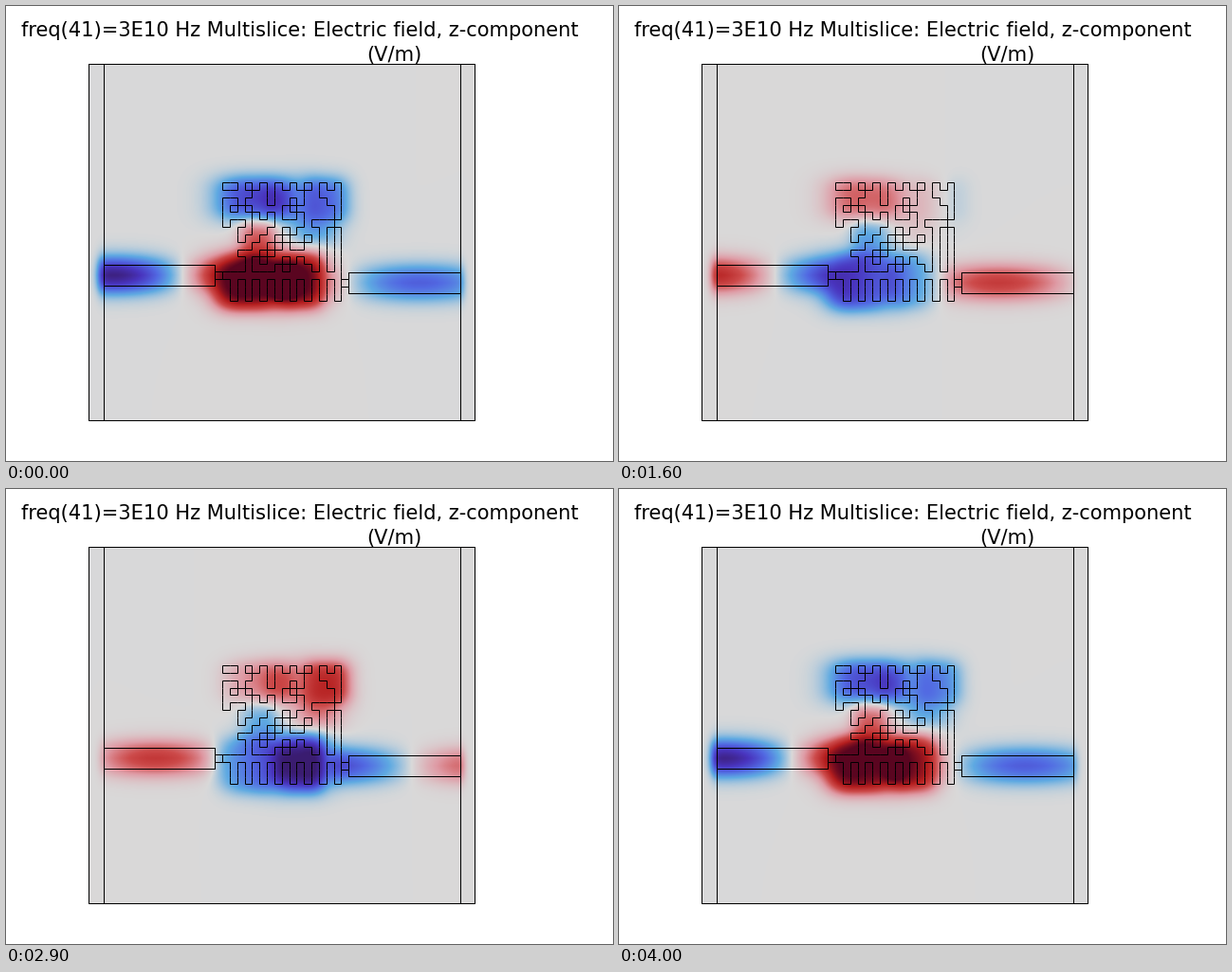
A matplotlib script for the animation above (4.1 s loop, 640x480 px).

```python
import numpy as np
import matplotlib.pyplot as plt
from matplotlib.animation import FuncAnimation
from matplotlib.collections import LineCollection
from matplotlib.colors import LinearSegmentedColormap

W, H, DPI = 640, 480, 100
FRAMES, STEP_MS = 41, 100
SPAN, GRID = 48, 16               # cells across the board and across the patch
CELL = 376 / SPAN
ORIGIN = np.array([102.7, 60.8])  # board corner in pixels
LEFT, RIGHT, TOP, BOTTOM = 87, 495, 61, 438
FEED_Y, EXIT_Y = 28.5, 29.5       # centre lines of the two strips, in cells


def rise(v, at, width):
    return 0.5 * (1 + np.tanh((v - at) / width))


def strip(y, row):
    """Soft cross-section of a line, 1 at its centre."""
    offset = np.abs(y - ORIGIN[1] - CELL * row)
    return rise(-offset, -15, 11) / rise(0, -15, 11)


def blob(x, y, cx, cy, hx, hy):
    r = (np.abs((x - cx) / hx) ** 3 + np.abs((y - cy) / hy) ** 3) ** (1 / 3)
    return rise(-r, -1, 10 / min(hx, hy))


def feed_wave(x):
    """Forward wave plus its weaker reflection."""
    k = 2 * np.pi * (x - 115) / 300
    wave = 0.73 * np.exp(1j * k) + 0.22 * np.exp(-1j * k)
    return wave * np.exp(-1j * np.radians(172)) * rise(x, 98, 5) * rise(-x, -220, 11)


def exit_wave(x):
    d = x - 360
    wave = (0.64 - 0.0012 * d) * np.exp(1j * np.radians(90 + 1.1 * d))
    return wave * rise(x, 343, 7) * rise(-x, -483, 4)


def patch_wave(x, y):
    base = (1.08 * blob(x, y, 255, 291, 34, 28) + 1.3 * blob(x, y, 311, 290, 26, 27)
            + 0.5 * blob(x, y, 266, 248, 17, 20))
    top = (0.7 * blob(x, y, 266, 203, 38, 20) + 0.25 * blob(x, y, 288, 207, 15, 16)
           + 0.78 * blob(x, y, 337, 204, 23, 21) + 0.4 * blob(x, y, 328, 236, 20, 14))
    return (base - top) * np.exp(1j * np.radians(0.45 * (x - 232)))


def complex_field():
    x = np.arange(LEFT, RIGHT) + 0.5
    y = np.arange(TOP, BOTTOM)[:, None] + 0.5
    return (patch_wave(x, y) + feed_wave(x) * strip(y, FEED_Y)
            + exit_wave(x) * strip(y, EXIT_Y))


def patch_cells():
    """Random metal cells with a trunk, comb teeth and two risers."""
    row, col = np.indices((GRID, GRID))
    metal = np.random.default_rng(7).random((GRID, GRID)) < 0.55
    metal[(row > 5) & (row < 12) & (col < 2)] = False
    teeth = (row == 0) | (row > 12)
    metal[teeth] = (col % 2 == 1)[teeth]
    metal[0, 0] = True
    risers = (row > 5) & (row < 12) & (col > 11)
    metal[risers] = (col % 2 == 1)[risers]
    metal[12] = True
    return metal


def patch_edges():
    cells = np.pad(patch_cells(), 1).astype(int)
    start = GRID - 1
    lines = []
    for j, i in np.argwhere(np.diff(cells, axis=0)):
        lines.append([(start + i, start + j + 1), (start + i + 1, start + j + 1)])
    for j, i in np.argwhere(np.diff(cells, axis=1)):
        lines.append([(start + i + 1, start + j), (start + i + 1, start + j + 1)])
    return lines


def rectangle(x0, y0, x1, y1):
    return [(x0, y0), (x1, y0), (x1, y1), (x0, y1), (x0, y0)]


def outlines():
    """All lines, in cells measured from the board corner."""
    lines = [rectangle(-2, 0, SPAN + 2, SPAN)]
    lines += [[(x, 0), (x, SPAN)] for x in (0, SPAN)]
    for x0, x1, stub, row in [(0, 15, 15, FEED_Y), (33, SPAN, 32, EXIT_Y)]:
        lines.append(rectangle(x0, row - 1.4, x1, row + 1.4))
        lines += [[(stub, row + s), (stub + 1, row + s)] for s in (-0.5, 0.5)]
    return [ORIGIN + CELL * np.array(line) for line in lines + patch_edges()]


fig = plt.figure(figsize=(W / DPI, H / DPI), dpi=DPI, facecolor="white")
ax = fig.add_axes([0, 0, 1, 1])
ax.axis("off")

wave_map = LinearSegmentedColormap.from_list(
    "wave", ["#3a1c70", "#4934be", "#5269e2", "#5faae2", "#d9d9d9",
             "#df9ba5", "#cd4b4b", "#b41e1e", "#5a0520"], N=512)
field = complex_field()
image = ax.imshow(field.real, cmap=wave_map, vmin=-1, vmax=1, aspect="auto",
                  interpolation="nearest", extent=(LEFT, RIGHT, BOTTOM, TOP))
ax.add_collection(LineCollection(outlines(), colors="black", linewidths=0.72))

font = dict(family="DejaVu Sans", size=15.16, color="black", va="baseline")
ax.text(15.5, 32, "freq(41)=3E10 Hz Multislice: Electric field, z-component", **font)
ax.text(380, 58, "(V/m)", **font)
ax.set_xlim(0, W)
ax.set_ylim(H, 0)


def draw(k):
    image.set_data((field * np.exp(-2j * np.pi * k / FRAMES)).real)
    return [image]


anim = FuncAnimation(fig, draw, frames=FRAMES, interval=STEP_MS,
                     repeat=True, repeat_delay=0, blit=False)
plt.show()
```
